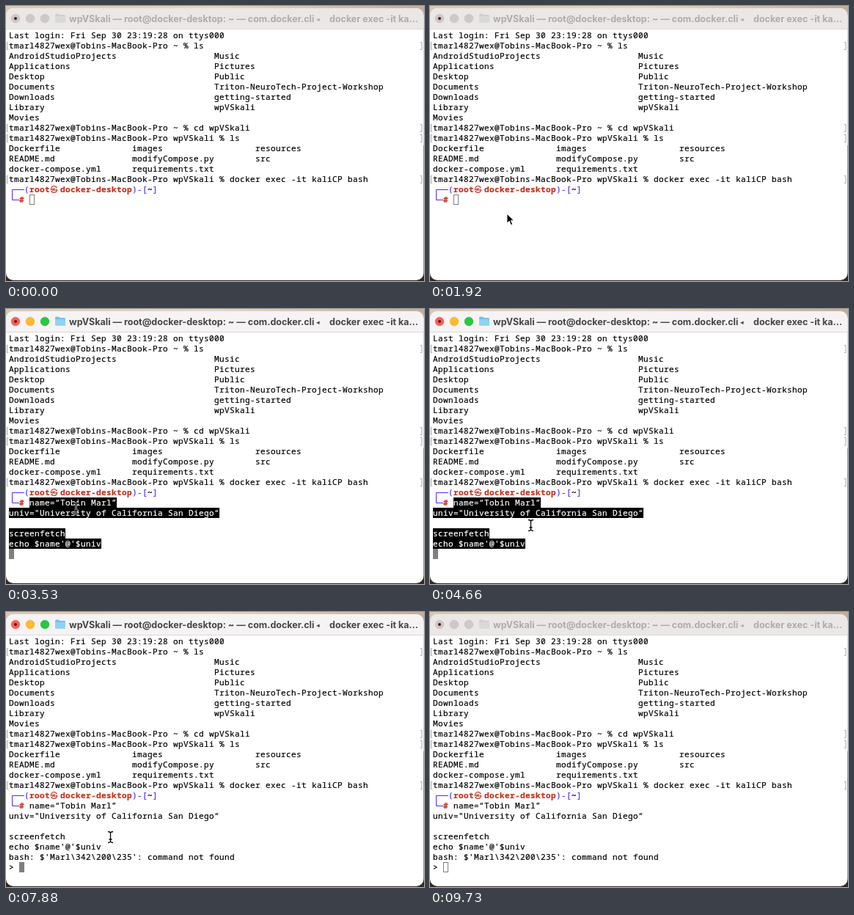
Recreate the animation shown at these times as an HTML page. Size 570x375 px, loop 9.75 s.

```html
<!DOCTYPE html>
<html lang="en">
<head>
<meta charset="utf-8">
<title>Terminal session</title>
<style>
  html, body { margin: 0; width: 100%; height: 100%; overflow: hidden; }
  svg { display: block; width: 570px; height: 375px; }
  text { white-space: pre; font: 500 11px "Noto Sans Mono", monospace; letter-spacing: .4px; stroke: #000; stroke-width: .2; }
  #title text { font: 700 12.5px Inter, sans-serif; letter-spacing: 0; fill: #474446; stroke: none; }
  .bar { fill: #f6f3f4; }
  .red { fill: #c5301c; stroke: #c5301c; font-weight: 700; }
  .blue { fill: #4a2dff; stroke: #4a2dff; }
  .inactive .bar { fill: #ebe7e7; }
  .inactive #title text { fill: #afabac; }
  .inactive .light { fill: #cdc9ca; stroke: #bfbbbc; }
  .inactive #folder { opacity: .45; filter: grayscale(1); }
  .selected text { fill: #fff; stroke: #fff; }
  #caret { fill: #7f7f7f; stroke: #7f7f7f; }
  #caret.hollow { fill: #fff; }
</style>
</head>
<body>
<svg id="stage" viewBox="0 0 570 375">
  <defs>
    <linearGradient id="top">
      <stop offset="0" stop-color="#d9c8b0"/>
      <stop offset=".5" stop-color="#e6d8bc"/>
      <stop offset="1" stop-color="#c4ad98"/>
    </linearGradient>
    <clipPath id="frame"><rect y="3" width="569.5" height="371" rx="10"/></clipPath>
    <path id="beamShape" d="M-3.5-7.5Q0-7.5 0-5V5Q0 7.5-3.5 7.5M3.5-7.5Q0-7.5 0-5M0 5Q0 7.5 3.5 7.5M-2 3H2"/>
  </defs>
  <rect width="570" height="190" fill="url(#top)"/>
  <rect y="190" width="570" height="185" fill="#352823"/>
  <g clip-path="url(#frame)">
    <rect width="570" height="375" fill="#fff"/>
    <rect class="bar" width="570" height="31"/>
    <path d="M0 31.5H570" stroke="#dcd8d9"/>
  </g>
  <g id="title">
    <g stroke-width=".6">
      <circle class="light" cx="13" cy="17" r="5.8" fill="#fe5f57" stroke="#e2463f"/>
      <circle class="light" cx="33" cy="17" r="5.8" fill="#febc2e" stroke="#e1a116"/>
      <circle class="light" cx="53" cy="17" r="5.8" fill="#28c840" stroke="#12ac28"/>
    </g>
    <circle cx="13" cy="17" r="2" fill="#4b1512"/>
    <g id="folder">
      <path d="M67 12q0-1.5 1.5-1.5h3.5l1.5 1.500h6q1.5 0 1.5 1.5v7.5q0 1.5-1.5 1.5h-11q-1.5 0-1.5-1.5z" fill="#6fc1ec"/>
      <path d="M67 14h14v7q0 1.5-1.5 1.5h-11q-1.5 0-1.5-1.5z" fill="#8fd2f6"/>
    </g>
    <text x="86" y="21.5">wpVSkali — root@docker-desktop: ~ — com.docker.cli <tspan font-size="8" dy="-1">◂</tspan><tspan x="441" dy="1">docker exec -it ka...</tspan></text>
  </g>
  <g id="history"></g>
  <path d="M25 250.5H8.5V264.5H18" fill="none" stroke="#4a2dff"/>
  <text y="254"><tspan class="blue" x="25">(</tspan><tspan class="red" x="32">root</tspan><tspan class="red" x="60.5" style="font:700 10px 'Noto Sans CJK KR','Noto Sans CJK JP',sans-serif">㉿</tspan><tspan class="red" x="74">docker-desktop</tspan><tspan class="blue">)-[</tspan><tspan font-weight="700">~</tspan><tspan class="blue">]</tspan></text>
  <text class="red" x="18" y="268">#</text>
  <g id="pasted"></g>
  <g id="reply"></g>
  <rect id="caret" width="6" height="13"/>
  <g id="arrow"><path d="M0 0V14L3.3 11L5.6 16.3L8.2 15.2L5.9 10H10.2Z" stroke="#fff" stroke-width="1.2"/></g>
  <g id="beam" fill="none">
    <use href="#beamShape" stroke="#fff" stroke-width="2.6"/>
    <use href="#beamShape" stroke="#000" stroke-width="1.3"/>
  </g>
</svg>
<script>
const LOOP = 9750, CELL = 7, LINE = 14, LEFT = 4, TOP = 33;
const el = id => document.getElementById(id);
const [stage, history, pasted, reply, caret, arrow, beam] =
  ['stage', 'history', 'pasted', 'reply', 'caret', 'arrow', 'beam'].map(el);

function add(parent, tag, attrs, text = '') {
  const node = document.createElementNS('http://www.w3.org/2000/svg', tag);
  for (const name in attrs) node.setAttribute(name, attrs[name]);
  node.textContent = text;
  parent.append(node);
}
const write = (parent, row, text, col = 0) =>
  add(parent, 'text', { x: LEFT + col * CELL, y: TOP + 11 + row * LINE }, text);
const columns = (width, ...words) => words.map(word => word.padEnd(width)).join('');

const prompt = 'tmarl4827wex@Tobins-MacBook-Pro ';
[
  'Last login: Fri Sep 30 23:19:28 on ttys000',
  prompt + '~ % ls',
  columns(40, 'AndroidStudioProjects', 'Music'),
  columns(40, 'Applications', 'Pictures'),
  columns(40, 'Desktop', 'Public'),
  columns(40, 'Documents', 'Triton-NeuroTech-Project-Workshop'),
  columns(40, 'Downloads', 'getting-started'),
  columns(40, 'Library', 'wpVSkali'),
  'Movies',
  prompt + '~ % cd wpVSkali',
  prompt + 'wpVSkali % ls',
  columns(24, 'Dockerfile', 'images', 'resources'),
  columns(24, 'README.md', 'modifyCompose.py', 'src'),
  columns(24, 'docker-compose.yml', 'requirements.txt'),
  prompt + 'wpVSkali % docker exec -it kaliCP bash'
].forEach((text, row) => {
  write(history, row, text);
  if (!text.startsWith(prompt)) return;
  const y = TOP + 2.5 + row * LINE;
  add(history, 'path', { d: `M3 ${y}H1.5v10H3M565 ${y}h2v10h-2`, fill: 'none', stroke: '#a8a8a8' });
});

const commands = [
  [16, 4, 'name=“Tobin Marl”'],
  [17, 0, 'univ="University of California San Diego“'],
  [19, 0, 'screenfetch'],
  [20, 0, "echo $name'@'$univ"]
];
for (const [row, col, text] of commands) {
  add(pasted, 'rect', { x: LEFT + col * CELL, y: TOP + row * LINE, width: text.length * CELL, height: LINE });
  write(pasted, row, text, col);
}
write(reply, 21, "bash: $'Marl\\342\\200\\235': command not found");
write(reply, 22, '>');

// Pointer moves: start, end, steps, shape, from x, y, to x, y
const moves = [
  [0, 0, 1, null, 0, 0, 0, 0],
  [510, 570, 2, arrow, 74, 324, 113, 338],
  [810, 980, 4, arrow, 113, 343, 113, 380],
  [1220, 1400, 4, arrow, 132, 370, 146, 347],
  [1460, 2030, 11, arrow, 144, 342, 95, 268],
  [2030, 2090, 2, beam, 95, 271, 95.5, 272],
  [4430, 4660, 4, beam, 103, 276, 137.5, 295],
  [7880, 7940, 2, beam, 142.5, 307, 263, 363],
  [8000, 8000, 1, null, 0, 0, 0, 0],
  [8350, 8520, 4, beam, 480, 376, 504, 363],
  [8580, 8760, 4, beam, 512, 364, 536, 385]
];

const show = (node, on) => { node.style.display = on ? '' : 'none'; };

function drawPointer(t) {
  const [start, end, steps, shape, x0, y0, x1, y1] = moves.findLast(move => move[0] <= t);
  const step = (end - start) / (steps - 1) || 1;
  const p = steps > 1 ? Math.min(1, Math.floor((t - start) / step + 1e-6) / (steps - 1)) : 0;
  for (const node of [arrow, beam]) show(node, node === shape);
  if (shape) shape.setAttribute('transform', `translate(${x0 + (x1 - x0) * p} ${y0 + (y1 - y0) * p})`);
}

function draw(now) {
  const t = now % LOOP;
  stage.classList.toggle('inactive', t < 2030 || t >= 9690);
  caret.classList.toggle('hollow', t < 2150 || t >= 9690);

  const selected = t >= 3530 && t < 5190;
  show(pasted, t >= 3530);
  pasted.classList.toggle('selected', selected);
  pasted.querySelectorAll('rect').forEach(box => show(box, selected));
  show(reply, t >= 6090);

  const [col, row] = t < 3530 ? [4, 16] : t < 6090 ? [0, 21] : [2, 22];
  caret.setAttribute('x', LEFT + col * CELL + 0.5);
  caret.setAttribute('y', TOP + row * LINE + 0.5);

  drawPointer(t);
  requestAnimationFrame(draw);
}
draw(0);
</script>
</body>
</html>
```
